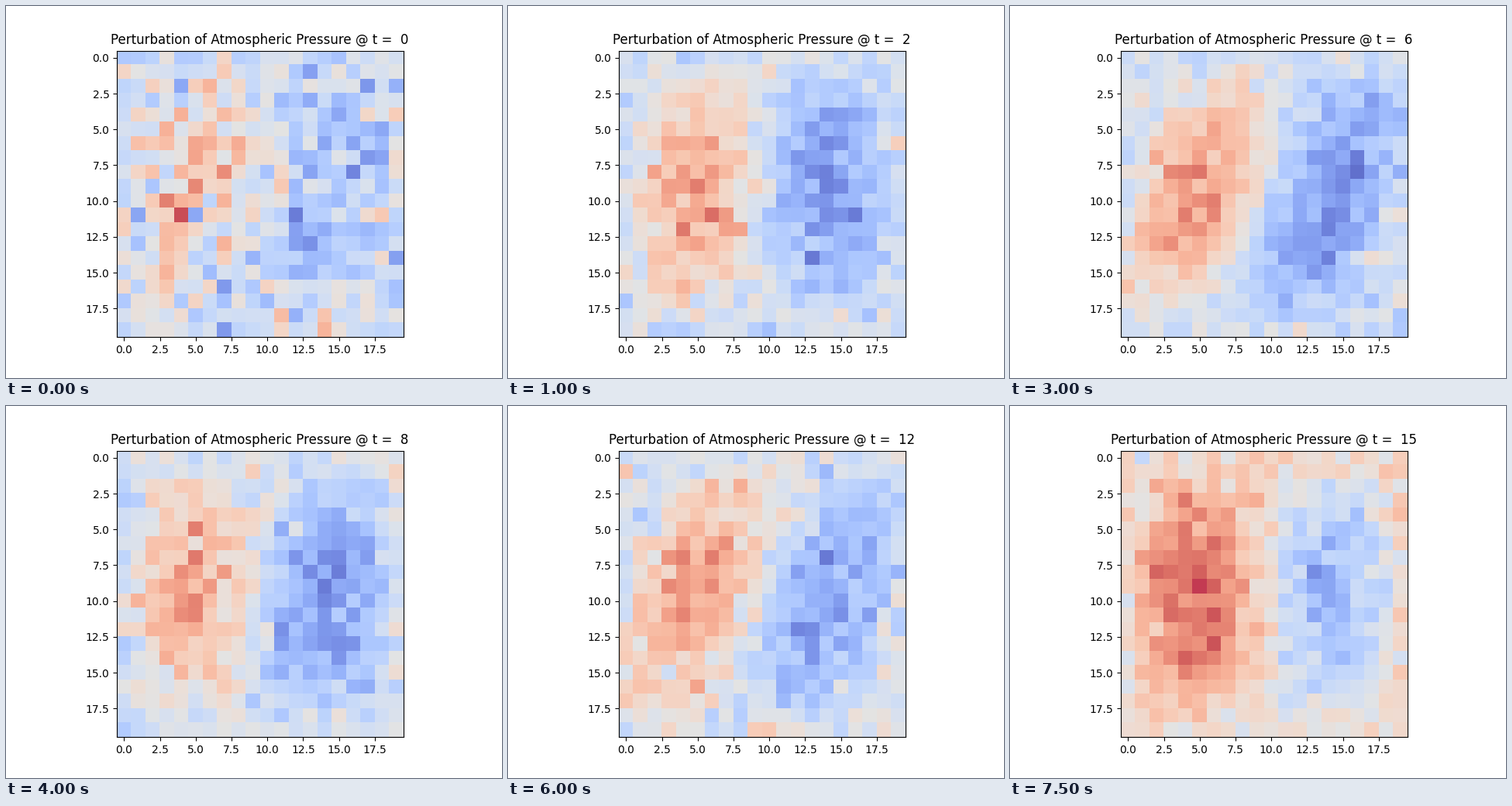
These frames come from a looping animation (640 by 480 pixels, 8 s). A matplotlib script:

```python
import numpy as np
import matplotlib.pyplot as plt
from matplotlib.animation import FuncAnimation

N = 20
STEPS = 16
MID = (N - 1) / 2

rows, cols = np.mgrid[0:N, 0:N]


def pressure(t):
    """Tilting high/low pair in noise, scaled to the colour range 0..1."""
    wave = 0.2 + 0.18 * np.sqrt(abs(np.sin(np.pi * t / 10)))
    noise = 0.18 - 0.31 * wave
    tilt = 0.3 * np.cos(np.pi * t / 6) ** 2
    level = 0.43 + 0.13 * (t / (STEPS - 1)) ** 8

    x = np.clip(cols - MID + tilt * (rows - MID), -MID, MID)
    pair = -np.sin(np.pi * x / MID) * np.sin(np.pi * rows / (N - 1))
    # The low is a little shallower than the high
    pair = np.where(pair < 0, 0.88 * pair, pair)

    rng = np.random.default_rng(40 + t)
    field = level + wave * pair + noise * rng.standard_normal((N, N))
    return np.clip(field, 0, 1)


fig, ax = plt.subplots(figsize=(6.4, 4.8), dpi=100)
image = ax.imshow(pressure(0), cmap="coolwarm", alpha=0.8, vmin=0, vmax=1)
title = ax.set_title("", x=0.498)


def draw(t):
    image.set_data(pressure(t))
    title.set_text(f"Perturbation of Atmospheric Pressure @ t =  {t}")
    return image, title


anim = FuncAnimation(fig, draw, frames=STEPS, interval=500,
                     repeat=True, repeat_delay=0, blit=False)
plt.show()
```
